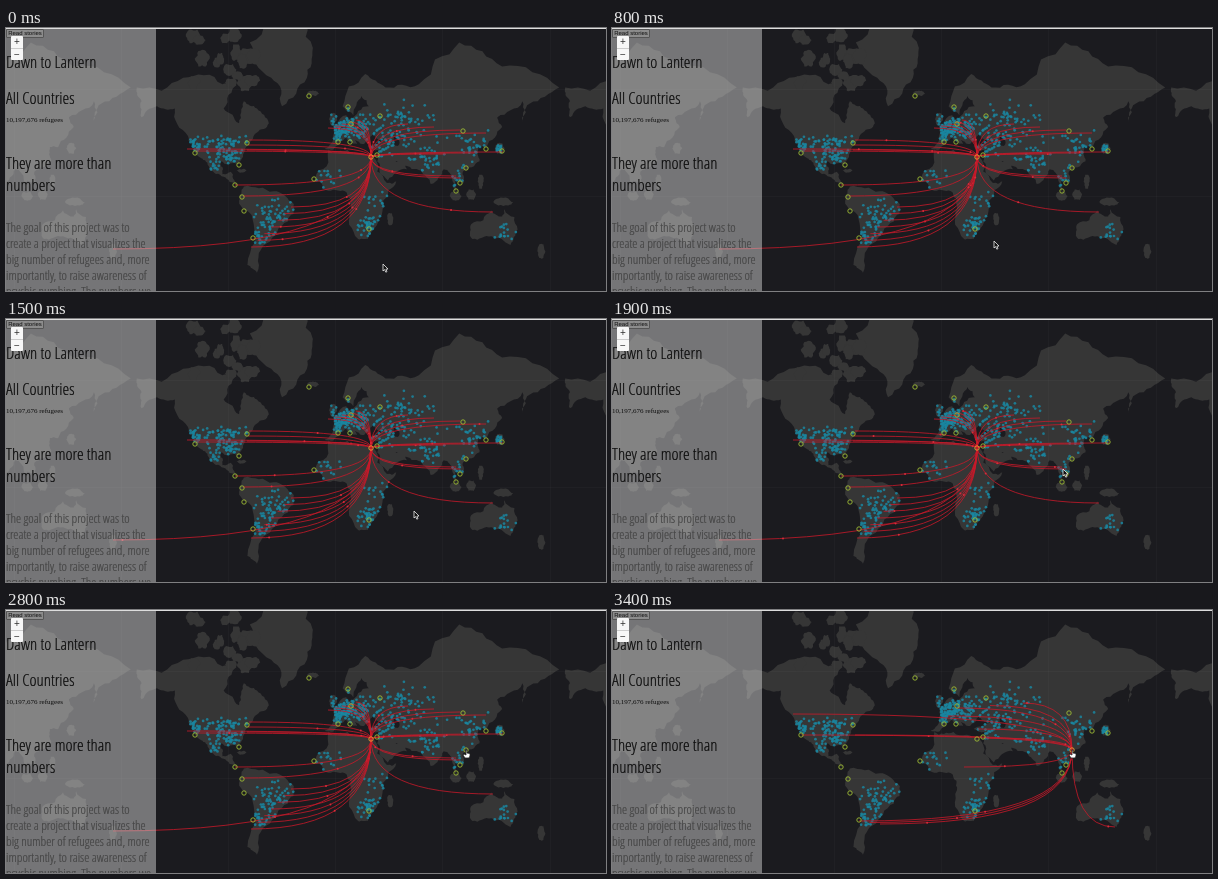
Write an HTML page with a canvas that moves like this. It is 600 by 263 pixels and loops after 3.5 s.

```html
<!DOCTYPE html>
<html lang="en">
<head>
<meta charset="utf-8">
<title>World map of journeys</title>
<style>
html, body { margin: 0; width: 600px; height: 263px; overflow: hidden; background: #1b1b1f; }
canvas { position: absolute; left: 0; top: 0; }
#panel { position: absolute; left: 0; top: 0; width: 150px; height: 263px; overflow: hidden;
  background: rgba(207,207,207,.5); color: #0c0c0c;
  font-family: "PT Sans Narrow", "Open Sans Condensed Light", "Open Sans", sans-serif;
  font-stretch: 75%; -webkit-text-stroke: .2px; }
#panel > * { position: absolute; left: 0; margin: 0; white-space: nowrap; font-weight: 300; }
#panel h1, #panel h2 { font-size: 17px; line-height: 22px; }
#panel #count { top: 87px; font: 7px/10px "Liberation Serif", serif; -webkit-text-stroke: 0; }
#panel #goal { top: 191px; font-size: 13px; line-height: 16.1px; color: #444; }
#panel #read { top: 1px; width: 36px; height: 7px; border: 1px solid #555; border-radius: 1px;
  background: #8c8c8c; font: 6px/7px "Liberation Sans", sans-serif; text-align: center; -webkit-text-stroke: 0; }
#zoom { position: absolute; left: 5px; top: 8px; width: 12px; height: 24px; background: #f7f7f7;
  border-radius: 1px; color: #333; font: 10px/12px "Liberation Sans", sans-serif; text-align: center; }
#zoom div + div { border-top: 1px solid #ccc; }
#edge { position: absolute; left: 0; top: 0; width: 600px; height: 1px; background: #ddd; }
</style>
</head>
<body>
<canvas id="map" width="600" height="263"></canvas>
<div id="panel">
  <div id="read">Read stories</div>
  <h1 style="top:23px">Dawn to Lantern</h1>
  <h2 style="top:59px">All Countries</h2>
  <p id="count">10,197,676 refugees</p>
  <h2 style="top:124px">They are more than<br>numbers</h2>
  <p id="goal">The goal of this project was to<br>create a project that visualizes the<br>big number of refugees and, more<br>importantly, to raise awareness of<br>psychic numbing. The numbers we</p>
</div>
<div id="zoom"><div>+</div><div>−</div></div>
<div id="edge"></div>
<canvas id="top" width="600" height="263"></canvas>
<script>
const g = document.getElementById('map').getContext('2d');
const overlay = document.getElementById('top').getContext('2d');
const WORLD = 428.4, SEA = '#1b1b1f', LAND = '#363636', LOOP = 3500;

// Key coast points (longitude, latitude); the detail between them is fractal
const coasts = {
  northAmerica: [-167,67,-128,70,-95,68,-82,68,-94,59,-81,52,-77,62,-66,59,-56,52,-66,47,-76,37,-81,26,-97,28,
    -95,18,-88,20,-83,9,-94,16,-106,22,-112,30,-118,34,-124,45,-135,59,-150,60,-163,55,-163,62],
  southAmerica: [-77,8,-52,4,-35,-7,-40,-21,-58,-37,-66,-54,-74,-50,-70,-18,-81,-4],
  africa: [-6,36,10,36,32,31,43,11,51,12,40,-4,38,-17,27,-34,19,-34,13,-10,8,4,-8,5,-17,15],
  eurasia: [-9,37,-2,45,9,56,12,54,28,60,22,64,15,56,6,60,25,71,42,67,70,68,104,78,140,73,188,67,163,61,157,52,
    157,62,136,55,140,50,127,38,120,38,121,28,107,20,108,11,101,13,103,2,98,14,91,22,80,10,72,21,57,26,48,30,
    60,22,44,13,35,28,36,36,27,38,41,42,31,46,24,40,13,45,18,40,9,44,-1,37],
  australia: [114,-23,131,-12,140,-17,142,-11,153,-27,147,-38,131,-32,115,-34],
  greenland: [-45,60,-54,70,-72,78,-40,83,-19,77,-24,70]
};
// Longitude, latitude, half width, half height
const islands = [[46,-19,3,7], [-2,54,4,7], [138,37,5,6], [114,1,5,6], [101,0,6,5], [141,-5,10,4],
  [173,-42,4,8], [-19,65,6,3], [-79,21,5,2], [122,12,3,8]];
// Dot clusters: x, y, spread, tries
const clusters = [[188,118,6,40], [222,120,12,95], [208,138,7,14], [268,193,15,85], [250,210,6,30],
  [344,98,12,150], [330,104,8,40], [395,97,20,85], [376,118,9,36], [424,132,9,36], [468,118,11,38],
  [492,121,5,50], [457,152,9,40], [502,205,9,22], [362,198,8,42], [372,176,9,18], [320,150,9,18]];
const cities = [303,68,342,79,374,88,345,96,332,114,344,114,241,115,189,125,233,137,229,157,236,169,238,183,
  247,210,308,151,363,201,371,127,457,103,480,121,496,123,454,155,450,163,460,140,365,129];
// Fans of routes: count, first start, last start
const scenes = [
  { hub: [365,129], fans: [[3,243,112,241,122], [2,181,121,190,123], [2,229,157,237,168], [7,285,179,245,219],
    [1,107,221], [4,402,96,480,105], [3,440,126,497,124], [2,450,148,454,150], [1,487,184], [5,322,100,350,92]] },
  { hub: [460,140], fans: [[2,181,104,190,125], [2,243,125,336,106], [3,345,98,411,93], [1,352,157],
    [2,366,119,375,128], [3,247,211,268,214], [1,503,217]] }];
// Pointer path: time, x, y
const pointer = [[0,377,236], [800,382,213], [1500,408,192], [1900,451,150], [2200,461,140], [LOOP,461,140]];

let seed = 7;
const rand = () => (seed = seed * 16807 % 2147483647) / 2147483647;
const spread = () => (rand() + rand() + rand() - 1.5) * 1.7;
const mix = (a, b, p) => a + (b - a) * p;
const project = (lon, lat) => [329.5 + lon * WORLD / 360,
  168 - WORLD / (2 * Math.PI) * Math.log(Math.tan(Math.PI / 4 + lat * Math.PI / 360))];
const toPoints = list => list.flatMap((v, i) => i % 2 ? [] : [[v, list[i + 1]]]);

function roughen(points, depth = 3) {
  if (!depth) return points;
  const finer = points.flatMap(([x, y], i) => {
    const [u, v] = points[(i + 1) % points.length], d = (rand() - 0.5) * 0.35;
    return [[x, y], [(x + u) / 2 + (v - y) * d, (y + v) / 2 - (u - x) * d]];
  });
  return roughen(finer, depth - 1);
}
function outline(points) {
  const path = new Path2D();
  points.forEach(([x, y]) => path.lineTo(x, y));
  path.closePath();
  return path;
}
function island([lon, lat, w, h]) {
  const [x, y] = project(lon, lat);
  const ring = Array.from({ length: 6 }, (_, i) => [x + w * Math.cos(i * Math.PI / 3), y + h * Math.sin(i * Math.PI / 3)]);
  return outline(roughen(ring, 2));
}
function disc(c, x, y, r, fill) {
  c.fillStyle = fill;
  c.beginPath();
  c.arc(x, y, r, 0, 7);
  c.fill();
}
function drawBase() {
  const base = document.createElement('canvas');
  base.width = 600; base.height = 263;
  const c = base.getContext('2d');
  const lands = Object.values(coasts).map(list => outline(roughen(toPoints(list).map(p => project(...p)))));
  lands.push(...islands.map(island));
  for (let i = 0; i < 18; i++)
    lands.push(island([mix(-122, -68, rand()), mix(68, 80, rand()), 4 + 5 * rand(), 4 + 6 * rand()]));
  const caspian = island([51, 42, 3, 6]);

  c.fillStyle = SEA;
  c.fillRect(0, 0, 600, 263);
  for (const shift of [-WORLD, 0, WORLD]) {
    c.setTransform(1, 0, 0, 1, shift, 0);
    c.fillStyle = LAND;
    lands.forEach(land => c.fill(land));
    c.fillStyle = SEA;
    c.fill(caspian);
  }
  c.resetTransform();
  c.fillStyle = 'rgba(255,255,255,.025)';
  for (let x = 8; x < 600; x += WORLD / 4) c.fillRect(Math.round(x), 0, 1, 263);
  for (let y = 61; y < 263; y += WORLD / 4) c.fillRect(0, Math.round(y), 600, 1);

  for (const [cx, cy, size, tries] of clusters)
    for (let i = 0; i < tries; i++) {
      const x = cx + size * spread(), y = cy + size * 0.75 * spread();
      if (lands.some(land => c.isPointInPath(land, x, y))) disc(c, x, y, 1.35, 'rgba(26,134,160,.85)');
    }
  return base;
}
function drawRoutes({ hub: [hx, hy], fans }, t) {
  g.strokeStyle = 'rgba(200,25,42,.8)';
  g.lineWidth = 1;
  for (const [n, x0, y0, x1, y1] of fans)
    for (let i = 0; i < n; i++) {
      const f = n > 1 ? i / (n - 1) : 0;
      const x = f ? mix(x0, x1, f) : x0, y = f ? mix(y0, y1, f) : y0;
      g.beginPath();
      g.moveTo(x, y);
      g.quadraticCurveTo(hx, y, hx, hy);
      g.stroke();
      const p = (t / LOOP + x * 0.37) % 1;
      disc(g, mix(hx, x, (1 - p) ** 2), mix(y, hy, p * p), 1, '#d82c3a');
    }
}
function drawPointer(t) {
  const i = pointer.findIndex(key => key[0] > t);
  const [t0, x0, y0] = pointer[i - 1], [t1, x1, y1] = pointer[i];
  const p = (t - t0) / (t1 - t0), hand = t >= 2200;
  const shape = hand
    ? [-1,0,0,0,0,3,3,3.5,3,6,2,8,-2,8,-4,5,-3,4,-1,5]
    : [0,0,0,7,1.6,5.6,2.8,8.2,4,7.6,2.9,5.2,5,5];
  const path = outline(toPoints(shape));
  overlay.clearRect(0, 0, 600, 263);
  overlay.save();
  overlay.translate(mix(x0, x1, p), mix(y0, y1, p));
  overlay.fillStyle = hand ? '#fff' : '#111';
  overlay.strokeStyle = hand ? '#222' : '#eee';
  overlay.lineWidth = 0.8;
  overlay.fill(path);
  overlay.stroke(path);
  overlay.restore();
}

const base = drawBase(), marks = toPoints(cities);
function frame(now) {
  const t = Math.floor(now % LOOP / 100) * 100;
  const scene = scenes[t < 2900 ? 0 : 1];
  g.drawImage(base, 0, 0);
  drawRoutes(scene, t);
  g.lineWidth = 0.9;
  for (const [x, y] of marks) {
    g.strokeStyle = x === scene.hub[0] ? '#f0a030' : '#9dbb35';
    g.beginPath();
    g.arc(x, y, 2.2, 0, 7);
    g.stroke();
  }
  drawPointer(t);
  requestAnimationFrame(frame);
}
requestAnimationFrame(frame);
</script>
</body>
</html>
```
